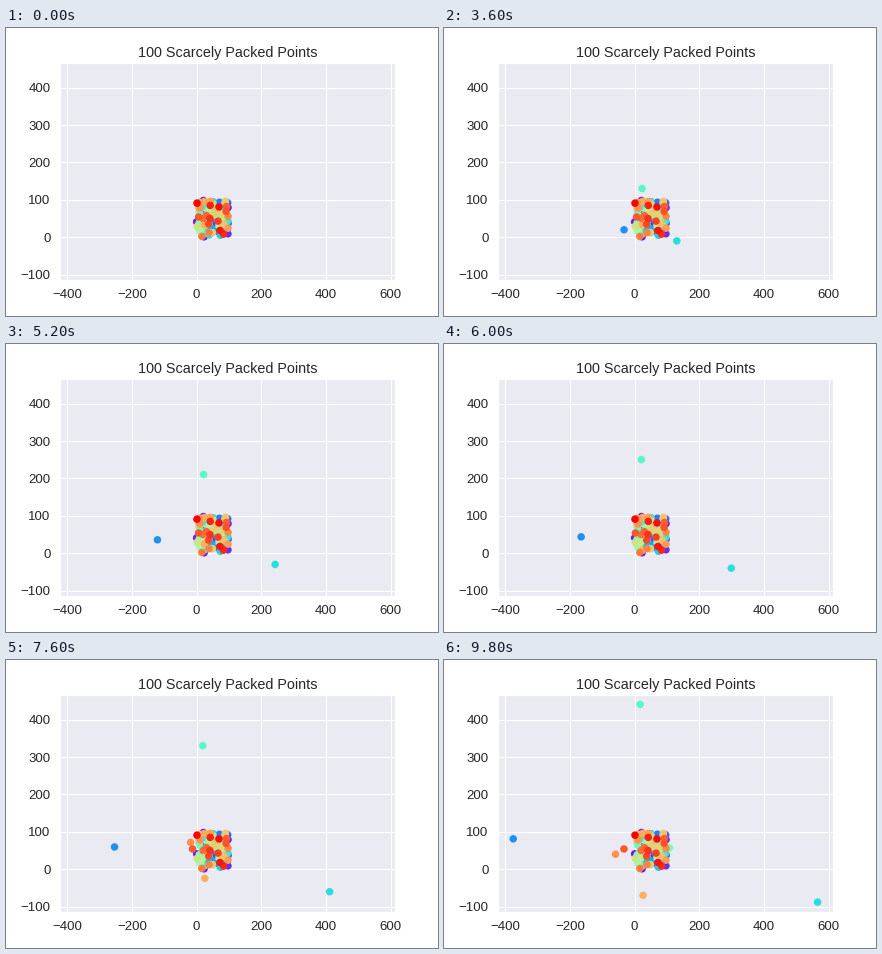
Animation, 432 px wide and 288 px high, one loop 10000 ms. Source, as a matplotlib script:

```python
import numpy as np
import matplotlib.pyplot as plt
from matplotlib.animation import FuncAnimation

FRAMES = 50
INTERVAL = 200
COUNT = 100

plt.rcParams["font.family"] = "Liberation Sans"

# The points that stand out, coldest to hottest
COLD = [(21, 98), (23, 1), (0, 41), (97, 79)]
HOT = [
    (42, 96), (97, 24), (11, 78), (97, 56), (38, 12), (16, 2), (20, 50),
    (30, 58), (92, 82), (91, 69), (37, 35), (66, 43), (41, 50), (83, 8),
    (42, 85), (72, 18), (69, 81), (1, 91),
]

# Points that leave the cluster: tone, first moving frame, origin, end
ESCAPES = [
    (19, 11.5, (39, 7), (-375, 81.2)),
    (33, 11.5, (39, 6.5), (565, -88.2)),
    (42, 8, (25, 30), (17, 441)),
    (50, 42, (90, 57), (108, 57)),
    (75, 24, (24, 33), (26, -70)),
    (80, 31, (7, 92), (-59, 40)),
    (88, 28, (6, 54), (-33, 54)),
]

rng = np.random.default_rng(4)
crowd = rng.uniform(1, 99, (COUNT - len(COLD) - len(HOT) - len(ESCAPES), 2))
resting = np.vstack([COLD, crowd, HOT])

tone = np.concatenate([
    np.linspace(0, 4, len(COLD)),
    np.linspace(5, 76, len(crowd)),
    np.linspace(77, 99, len(HOT)),
    [escape[0] for escape in ESCAPES],
])
order = np.argsort(tone, kind="stable")


def escape_position(frame, start, origin, end):
    """Constant speed from origin to end, reached on the last frame."""
    progress = max(0, (frame - start) / (FRAMES - 1 - start))
    return np.array(origin) + progress * np.subtract(end, origin)


def positions(frame):
    moving = [escape_position(frame, *path) for _, *path in ESCAPES]
    return np.vstack([resting, moving])[order]


fig = plt.figure(figsize=(6, 4), dpi=72, facecolor="white")
ax = fig.add_axes([0.125, 0.125, 0.775, 0.755], facecolor="#EAEAF2")
ax.set_xlim(-422, 612)
ax.set_ylim(-114.7, 467.5)
ax.set_xticks(range(-400, 601, 200))
ax.set_yticks(range(-100, 401, 100))
ax.set_axisbelow(True)
ax.grid(color="white", linewidth=1)
ax.tick_params(length=0, pad=9.5, labelsize=13.2, labelcolor="0.15")
for spine in ax.spines.values():
    spine.set(color="white", linewidth=1.25)
ax.set_title("100 Scarcely Packed Points", fontsize=14.4, color="0.15", pad=6)

dots = ax.scatter(*positions(0).T, s=36, linewidths=1.5, edgecolors="face",
                  c=plt.cm.rainbow(tone[order] / 99))


def update(frame):
    dots.set_offsets(positions(frame))
    return (dots,)


anim = FuncAnimation(fig, update, frames=FRAMES, interval=INTERVAL,
                     repeat=True, repeat_delay=0)
plt.show()
```
